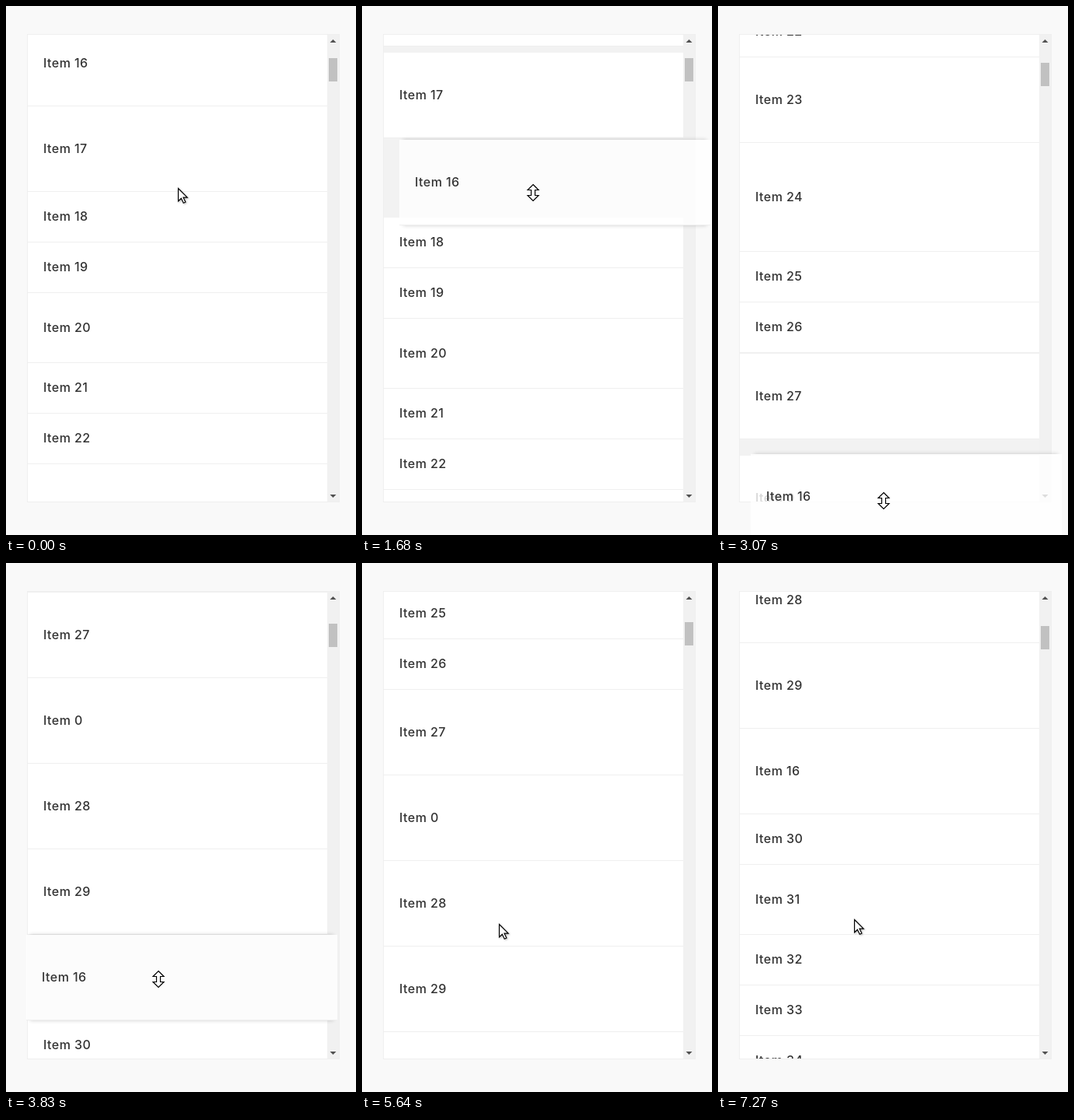
Recreate the animation shown at these times as an HTML page. Size 450 by 680 pixels, loop 7310 ms.

```html
<!DOCTYPE html>
<html lang="en">
<head>
<meta charset="utf-8">
<title>Sortable list</title>
<style>
  html, body { margin: 0; width: 100%; height: 100%; overflow: hidden; background: #f9f9f9; }
  body { position: relative; font: 500 16px Inter, "Open Sans", sans-serif; letter-spacing: .45px; color: #333; }
  #list { position: absolute; left: 27px; top: 36px; width: 400px; height: 600px; overflow: hidden;
    border: 1px solid #efefef; background: #f2f2f2; }
  .row { position: absolute; left: 0; top: 0; width: 385px; box-sizing: border-box; padding: 0 0 2px 20px;
    display: flex; align-items: center; background: #fff; border-bottom: 1px solid #efefef; }
  #helper { width: 400px; height: 110px; background: rgba(255,255,255,.8);
    box-shadow: 0 5px 5px -5px rgba(0,0,0,.2), 0 -5px 5px -5px rgba(0,0,0,.2); }
  #bar { position: absolute; right: 0; top: 0; width: 15px; height: 600px; background: #f1f1f1; }
  #bar svg { position: absolute; left: 0; top: 0; fill: #505050; }
  #thumb { position: absolute; left: 2px; top: 0; width: 11px; height: 30px; background: #c1c1c1; }
  .cursor { position: absolute; left: 0; top: 0; overflow: visible; fill: #fff; stroke: #000; stroke-width: 1.2; }
  #arrow { filter: drop-shadow(1px 1px 1px rgba(0,0,0,.3)); }
</style>
</head>
<body>
<div id="list">
  <div id="bar">
    <svg width="15" height="600"><path d="M3.5 10l4-4 4 4zM3.5 591l4 4 4-4z"/></svg>
    <div id="thumb"></div>
  </div>
</div>
<div id="helper" class="row">Item 16</div>
<svg id="arrow" class="cursor" width="14" height="22"><path d="M.5 .5v16.3l3.8-3.6 2.9 6 2.6-1.2-2.8-5.8h5.1z"/></svg>
<svg id="resize" class="cursor" width="1" height="1"><path d="M0-10.5L7-3.5H2.5V3.5H7L0 10.5-7 3.5H-2.5V-3.5H-7z"/></svg>
<script>
const LOOP = 7310, GRAB = 440, DROP = 4390, DRAGGED = 16, SLOT = 110;
const $ = id => document.getElementById(id);
const move = (el, x, y) => el.style.transform = `translate(${Math.round(x)}px,${Math.round(y)}px)`;
const show = (el, on) => el.style.visibility = on ? "visible" : "hidden";

// Progress from 0 to 1 between two times: even, or with soft ends
const ramp = (t, from, to) => Math.min(1, Math.max(0, (t - from) / (to - from)));
const soft = (t, from, to) => { const u = ramp(t, from, to); return u * u * (3 - 2 * u); };

// The CSS "ease" curve, solved by bisection
function ease(x) {
  const bezier = (u, p, q) => 3 * (1 - u) ** 2 * u * p + 3 * (1 - u) * u * u * q + u ** 3;
  let lo = 0, hi = 1;
  for (let i = 0; i < 20; i++) {
    const mid = (lo + hi) / 2;
    if (bezier(mid, .25, .25) < x) lo = mid; else hi = mid;
  }
  return bezier(hi, .1, 1);
}

function rowHeight(n) {
  if (n === 24) return 140;
  if (n === 20 || n === 31) return 90;
  return [0, 16, 17, 23, 27, 28, 29].includes(n) ? 110 : 65;
}

// Rows give way as the dragged one reaches them, faster once the list scrolls
const giveWay = top => top < 570 ? 1477 + (top - 110) * 2.12 : 2454 + (top - 570) * .95;

const numbers = Array.from({ length: 21 }, (_, i) => 15 + i);
numbers.splice(13, 0, 0);

let nextTop = -rowHeight(15);
const rows = numbers.map(n => {
  const el = document.createElement("div"), top = nextTop;
  el.className = "row";
  el.textContent = "Item " + n;
  el.style.height = rowHeight(n) + "px";
  $("list").insertBefore(el, $("bar"));
  nextTop += rowHeight(n);
  return { el, n, top };
});
const slotEnd = rows.find(row => row.n === 30).top;

// Automatic scrolling near the edges, then three turns of the wheel
const scrollAt = t => 33 * ramp(t, 1100, 1370) - 854 * ramp(t, 2494, 3597)
  + 350 * soft(t, 5450, 5920) - 307 * soft(t, 6300, 6700) - 308 * soft(t, 6910, 7270);

const helperAt = t => {
  const back = soft(t, 3350, 4020);
  return [
    28 + 23 * soft(t, 1080, 1850) - 9 * soft(t, 2000, 2750) - 20 * back,
    18 + 558 * soft(t, 1140, 2700) - 122 * back
  ];
};

const arrowAt = t => {
  const a = soft(t, 10, 300), b = soft(t, 5010, 5300), c = soft(t, 6300, 6700);
  return t < DROP ? [221 - 22 * a, 234 - 155 * a] : [195 - 19 * b - c, 514 - 50 * b - 6 * c];
};

function draw() {
  const t = Math.floor(performance.now() % LOOP / 10) * 10;
  const dragging = t >= GRAB && t < DROP;
  const scroll = scrollAt(t);

  for (const { el, n, top } of rows) {
    let y = top + scroll - 18;
    if (top > 0 && top < slotEnd) {
      const start = giveWay(top);
      y -= SLOT * ease(ramp(t, start, start + 300));
    }
    if (n === DRAGGED) {
      show(el, !dragging);
      if (t >= DROP) y += slotEnd - SLOT;
    }
    move(el, 0, y);
  }
  move($("thumb"), 0, 30.3 - scroll * .0128);

  // The pointer runs slightly ahead of the row it drags
  const [px, py] = helperAt(t + 15);
  move($("helper"), ...helperAt(t));
  move($("resize"), px + 171, py + 60);
  move($("arrow"), ...arrowAt(t));
  show($("helper"), dragging);
  show($("resize"), dragging);
  show($("arrow"), !dragging);
  requestAnimationFrame(draw);
}
draw();
</script>
</body>
</html>
```
